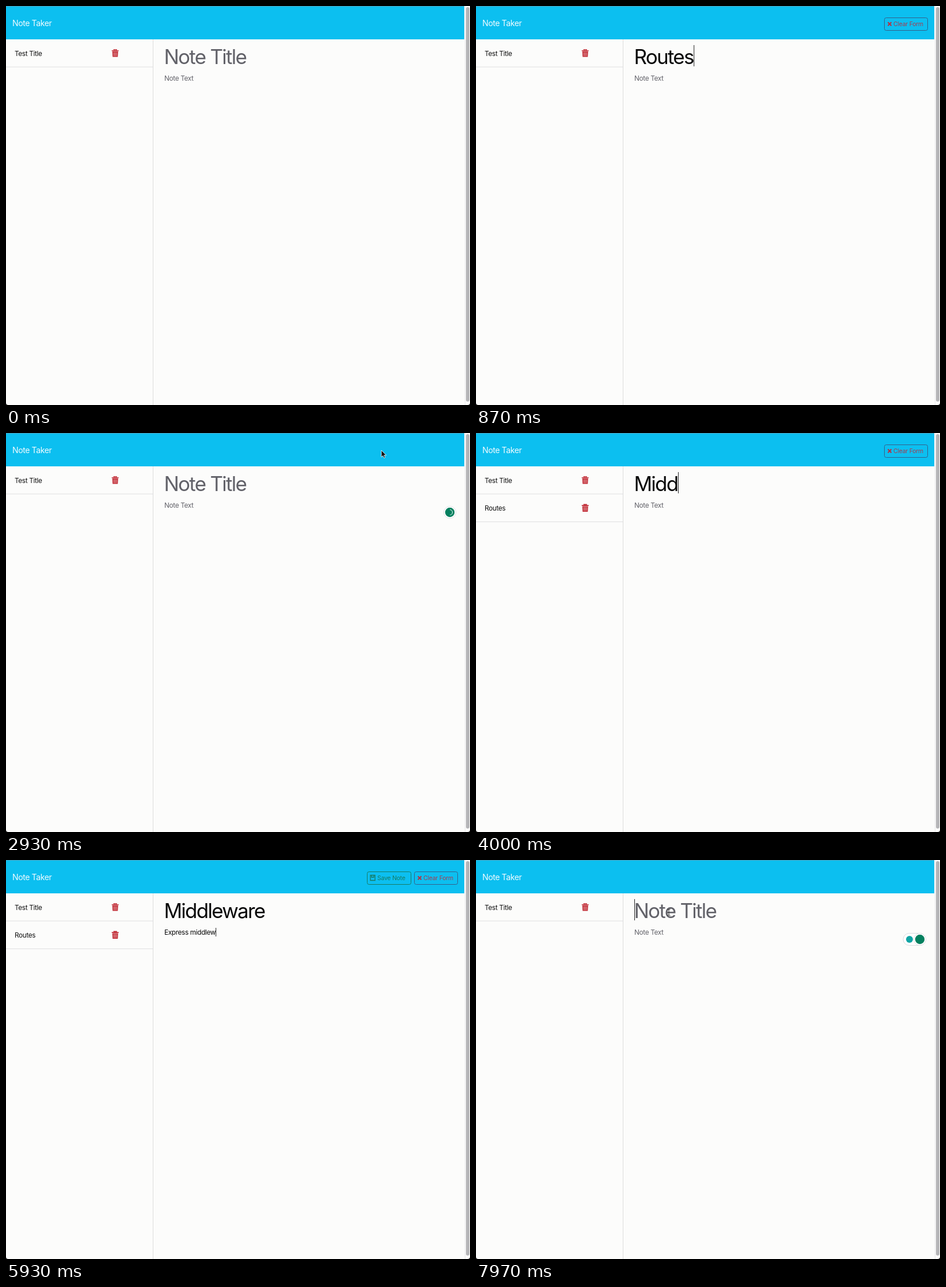
An HTML page that plays this animation: 806x694 px, repeating every 8000 ms.

```html
<!DOCTYPE html>
<html lang="en">
<head>
<meta charset="utf-8">
<title>Note Taker</title>
<style>
  html, body { margin: 0; width: 100%; height: 100%; overflow: hidden; background: #fcfcfb; }
  svg { display: block; width: 806px; height: 694px; }
  text {
    font: 11.8px Inter, "Liberation Sans", sans-serif; font-optical-sizing: none;
    letter-spacing: -.03em; fill: #111; white-space: pre;
  }
  #brand { font-size: 14.1px; fill: #f2fbff; }
  #title { font-size: 35px; letter-spacing: -.05em; }
  .button text { font-size: 10.4px; letter-spacing: -.02em; }
</style>
</head>
<body>
<svg viewBox="0 0 806 694">
  <defs>
    <g id="trash" fill="none" stroke="#c22f39">
      <path d="M-6 -4.3H6M-2.3 -4.5V-6H2.3V-4.5" stroke-width="1.6"/>
      <path d="M-5 -3H5L4.5 6.5H-4.5Z" fill="#c22f39" stroke="none"/>
      <path d="M-2.3 -1.5V5M0 -1.5V5M2.3 -1.5V5" stroke="#eec0c0" stroke-width=".8"/>
    </g>
  </defs>
  <rect width="806" height="694" fill="#fcfcfb"/>
  <rect width="796" height="58" fill="#0cbff0"/>
  <path d="M0 .5H796" stroke="#4fa6c4"/>
  <text id="brand" x="11" y="34.6">Note Taker</text>
  <path d="M255.5 58V694" stroke="#dcdcdc"/>
  <path d="M797.5 0V694" stroke="#e9e9ec"/>
  <rect x="799" y="2" width="6" height="686" rx="3" fill="#b5b5b8"/>
  <g id="rows"></g>

  <g class="button" id="save">
    <rect x="627.5" y="20.5" width="76" height="22" rx="3" fill="none" stroke="#187a62"/>
    <path d="M633 26.5H641V35.5H633ZM635 27V30H639V27" fill="none" stroke="#187a62" stroke-width="1.3"/>
    <text x="645" y="35" style="fill:#187a62">Save Note</text>
  </g>
  <g class="button" id="clear">
    <rect x="709.5" y="20.5" width="75" height="22" rx="3" fill="none" stroke="#35608a"/>
    <path d="M715.5 28.2L721.5 34.2M721.5 28.2L715.5 34.2" stroke="#b8303f" stroke-width="2"/>
    <text x="725" y="35" style="fill:#a83c50">Clear Form</text>
  </g>

  <text id="title" x="274.5" y="100.5"></text>
  <text id="body" x="275" y="130"></text>
  <path id="caret" stroke="#222"/>

  <g id="pill">
    <rect x="742" y="127.5" width="39" height="21" rx="10.5" fill="#fff" stroke="#d9dbe0"/>
    <circle cx="753" cy="138" r="6" fill="#12a5a5"/>
  </g>
  <g id="badge">
    <circle cx="771" cy="138" r="10.5" fill="#fff" stroke="#dfe1e5"/>
    <circle cx="771" cy="138" r="8.2" fill="#04805f"/>
  </g>
  <path id="spinner" d="M771 133.5A4.5 4.5 0 0 1 771 142.5" fill="none" stroke="#d5eee6" stroke-width="1.2"/>
  <circle id="dot" cx="775.5" cy="142.5" r="3" fill="#04805f"/>

  <path id="arrow" d="M0 -6V6L2.7 3.5L4.6 7.5L6.6 6.6L4.8 2.7H8.5Z" fill="#111" stroke="#fff" stroke-width=".8"/>
  <path id="beam" d="M-2.5 -5.5Q0 -5.5 0 -4Q0 -5.5 2.5 -5.5M0 -4V4M-2.5 5.5Q0 5.5 0 4Q0 5.5 2.5 5.5" fill="none" stroke="#333"/>
  <path d="M0 690Q0 694 4 694H0ZM806 690Q806 694 802 694H806Z" fill="#111"/>
</svg>
<script>
const LOOP = 8000;
const $ = id => document.getElementById(id);
const show = (id, on) => $(id).setAttribute('display', on ? 'inline' : 'none');
const within = (t, ...spans) => spans.some(([from, to]) => t >= from && t < to);

// Each note is typed, then cleared from the form when saved.
const notes = [
  { title: 'Routes', start: 90, step: 130, body: 'Express routes', bodyStart: 1300, saved: 2500 },
  { title: 'Middleware', start: 3650, step: 95, body: 'Express middleware', bodyStart: 5150, saved: 6400 }
];
const BODY_STEP = 55;

const rows = [
  { name: 'Test Title', spans: [[0, LOOP]] },
  { name: 'Routes', spans: [[3000, 7350]] },
  { name: 'Middleware', spans: [[6600, 7050]] }
];
$('rows').innerHTML = rows.map((row, i) => `
  <g id="row${i}" transform="translate(0 ${i * 48.4})">
    <text x="15" y="86.7">${row.name}</text>
    <use href="#trash" x="189.7" y="82"/>
    <path d="M0 106H255" stroke="#dedee0"/>
  </g>`).join('');

// Pointer waypoints: time, x, y.
const paths = [
  [[2150, 520, 180], [2420, 652, 36], [2980, 652, 36], [3350, 420, 90], [3650, 420, 90]],
  [[6150, 520, 180], [6360, 655, 36], [6570, 655, 36], [6670, 499, 71], [6950, 189, 179],
   [7070, 189, 179], [7230, 189, 131], [7370, 189, 131], [7650, 335, 91], [LOOP, 335, 91]]
];

function pointerAt(t) {
  const path = paths.find(p => within(t, [p[0][0], p[p.length - 1][0]]));
  if (!path) return null;
  const next = path.findIndex(p => p[0] > t);
  const [t0, x0, y0] = path[next - 1], [t1, x1, y1] = path[next];
  const u = (t - t0) / (t1 - t0);
  return [x0 + (x1 - x0) * u, y0 + (y1 - y0) * u];
}

const typed = (text, start, step, t) =>
  t < start ? '' : text.slice(0, Math.floor((t - start) / step) + 1);

function setField(id, value, placeholder) {
  const el = $(id);
  el.textContent = value || placeholder;
  el.style.fill = value ? '#080808' : '#626269';
}

function placeCaret(t, note, title, body) {
  const inBody = note && t >= note.bodyStart - 100;
  const lastKey = !note ? 0 : inBody
    ? note.bodyStart + (note.body.length - 1) * BODY_STEP
    : note.start + (note.title.length - 1) * note.step;
  const blinkOn = t < lastKey || (t - lastKey) % 1000 < 450;
  show('caret', note ? blinkOn : within(t, [3380, 3650], [7680, LOOP]));
  const value = inBody ? body : title;
  const x = 275.5 + (value ? $(inBody ? 'body' : 'title').getComputedTextLength() : 0);
  $('caret').setAttribute('d', inBody ? `M${x} 118V133` : `M${x} 68V105`);
}

function render(t) {
  const note = notes.find(n => within(t, [n.start, n.saved]));
  const title = note ? typed(note.title, note.start, note.step, t) : '';
  const body = note ? typed(note.body, note.bodyStart, BODY_STEP, t) : '';
  setField('title', title, 'Note Title');
  setField('body', body, 'Note Text');
  placeCaret(t, note, title, body);
  show('clear', note);
  show('save', body);
  rows.forEach((row, i) => show('row' + i, within(t, ...row.spans)));

  const loading = within(t, [2500, 3000]), pill = t >= 7800;
  show('pill', pill);
  show('spinner', loading);
  show('badge', loading || pill ||
    within(t, [1000, 1300], [2200, 2500], [3000, 3650], [4750, 5150], [6200, 6400]));
  show('dot', within(t, [6400, 6750]));

  const pointer = pointerAt(t);
  const overForm = pointer && pointer[0] > 256 && pointer[1] > 58;
  show('arrow', pointer && !overForm);
  show('beam', overForm);
  if (pointer) $(overForm ? 'beam' : 'arrow').setAttribute('transform', `translate(${pointer})`);
}

const began = performance.now();
function tick() {
  render((performance.now() - began) % LOOP);
  requestAnimationFrame(tick);
}
tick();
</script>
</body>
</html>
```
